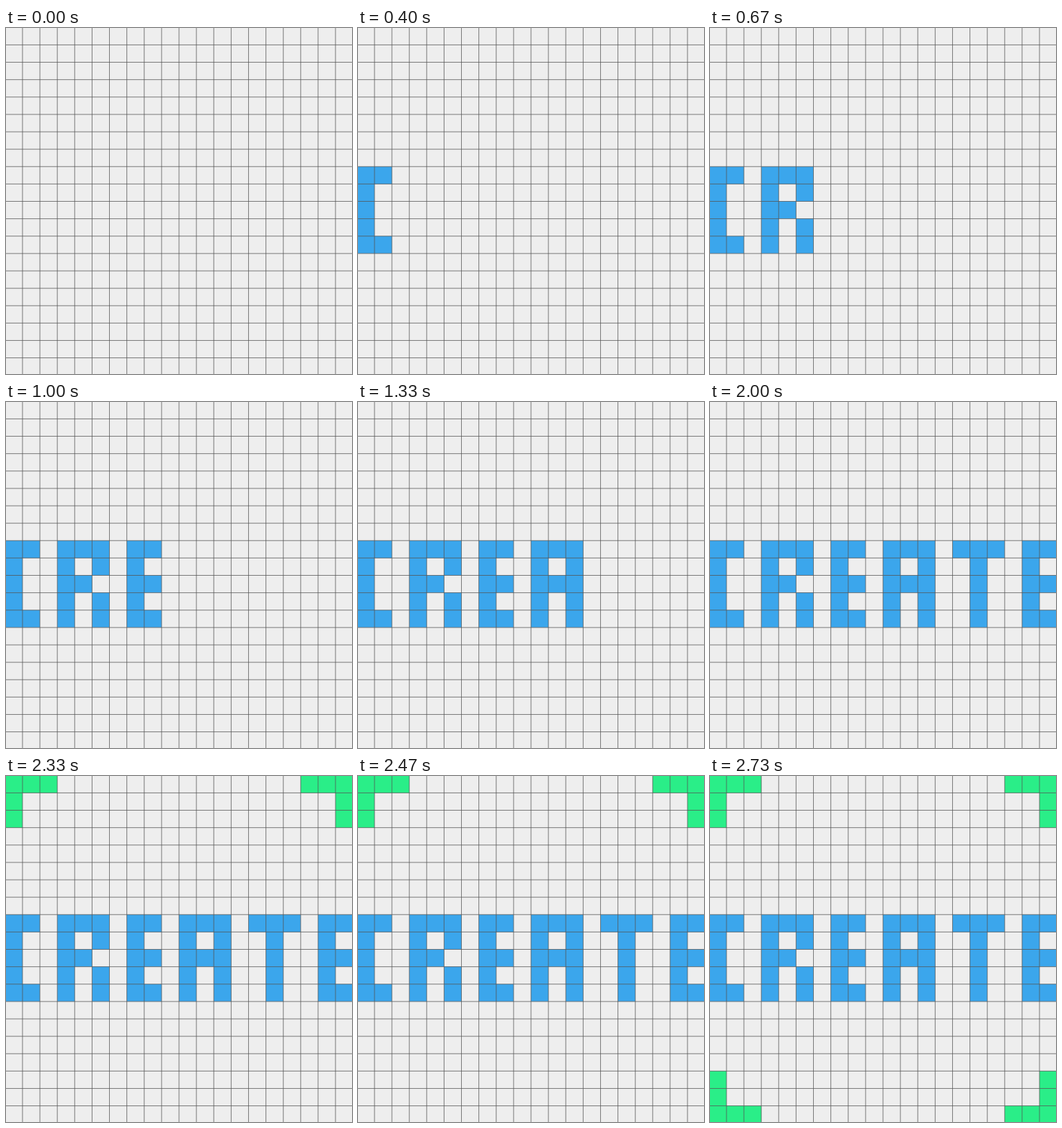
Write an HTML page with a canvas that moves like this. It is 480 px wide and 480 px high and loops after 2990 ms.

```html
<!DOCTYPE html>
<html lang="en">
<head>
<meta charset="utf-8">
<title>Create</title>
<style>
html, body { margin: 0; width: 100%; height: 100%; overflow: hidden; background: #eee; }
canvas { display: block; width: 480px; height: 480px; }
</style>
</head>
<body>
<canvas id="stage" width="480" height="480"></canvas>
<script>
const ctx = document.getElementById('stage').getContext('2d');
const LOOP = 2990, PITCH = 24.12;
const BLUE = '#3ba6ec', GREEN = '#2aee88';

const lineX = c => 240 + (c - 10) * PITCH;
const lineY = r => 240.5 + (r - 10) * PITCH;

const E = ['##', '#.', '##', '#.', '##'];
const shape = (at, col, row, color, rows) => ({ at, col, row, color, rows });
const letter = (at, col, rows) => shape(at, col, 8, BLUE, rows);

const shapes = [
  letter(330, 0, ['##', '#.', '#.', '#.', '##']),
  letter(670, 3, ['###', '#.#', '##.', '#.#', '#.#']),
  letter(1000, 7, E),
  letter(1330, 10, ['###', '#.#', '###', '#.#', '#.#']),
  letter(1670, 14, ['###', '.#.', '.#.', '.#.', '.#.']),
  letter(2000, 18, E),
  shape(2330, 0, 0, GREEN, ['###', '#..', '#..']),
  shape(2330, 17, 0, GREEN, ['###', '..#', '..#']),
  shape(2670, 0, 17, GREEN, ['#..', '#..', '###']),
  shape(2670, 17, 17, GREEN, ['..#', '..#', '###'])
];

function fillShape(s) {
  ctx.fillStyle = s.color;
  ctx.beginPath();
  s.rows.forEach((cells, j) => [...cells].forEach((cell, i) => {
    if (cell === '#') ctx.rect(lineX(s.col + i), lineY(s.row + j), PITCH, PITCH);
  }));
  ctx.fill();
}

function drawGrid() {
  ctx.strokeStyle = 'rgba(85, 85, 85, 0.75)';
  ctx.lineWidth = 1;
  for (let i = 1; i < 20; i++) {
    const x = lineX(i), y = lineY(i);
    ctx.beginPath();
    ctx.moveTo(x, 0);
    ctx.lineTo(x, 480);
    ctx.stroke();
    ctx.beginPath();
    ctx.moveTo(0, y);
    ctx.lineTo(480, y);
    ctx.stroke();
  }
}

function draw(t) {
  ctx.fillStyle = '#eee';
  ctx.fillRect(0, 0, 480, 480);
  shapes.filter(s => t >= s.at).forEach(fillShape);
  drawGrid();
}

const start = performance.now();
function tick() {
  draw((performance.now() - start) % LOOP);
  requestAnimationFrame(tick);
}
tick();
</script>
</body>
</html>
```
